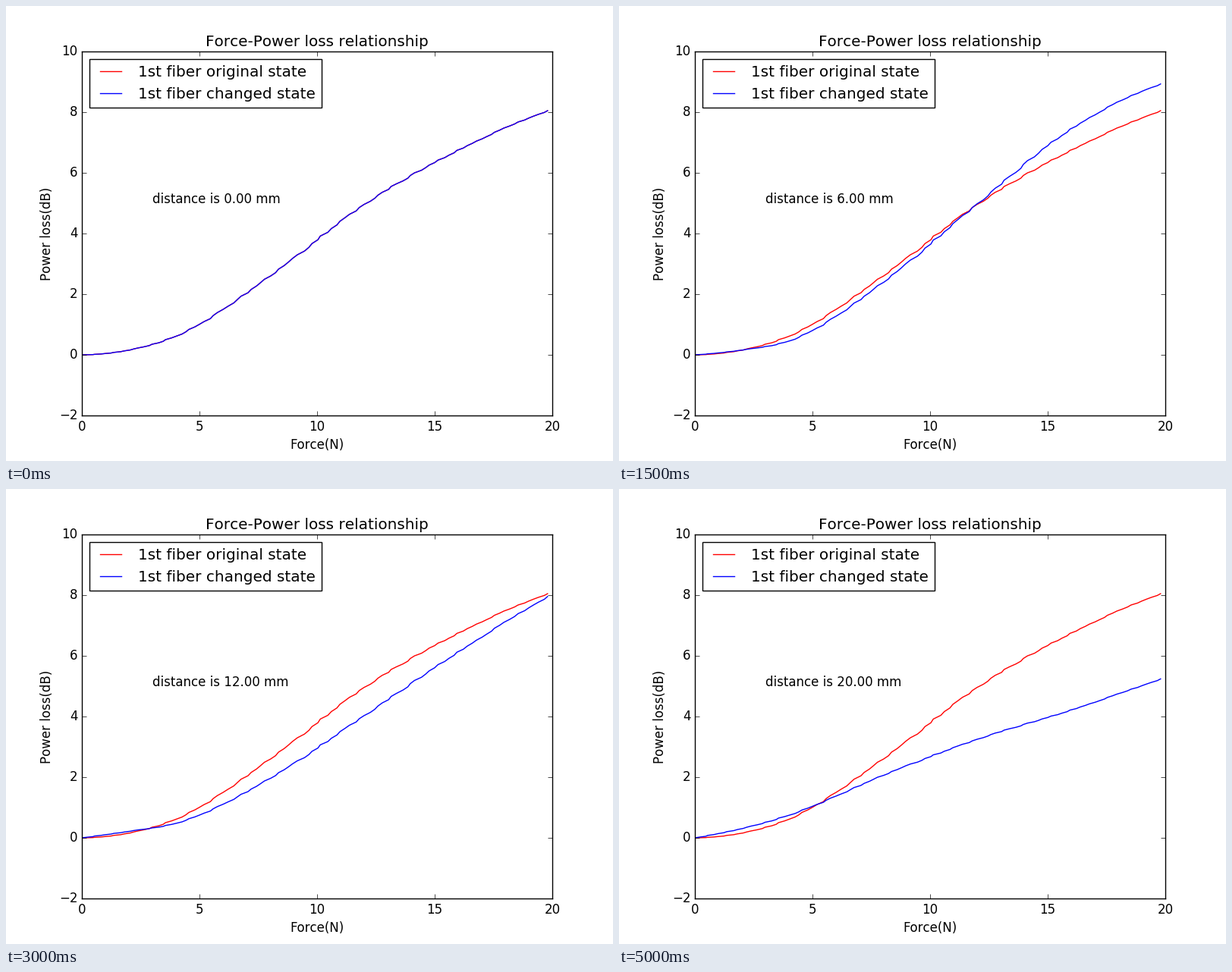
Write a matplotlib script that moves like this. It is 800 px wide and 600 px high and loops after 5.5 s.

```python
import numpy as np
import matplotlib.pyplot as plt
from matplotlib.animation import FuncAnimation

plt.style.use("classic")
plt.rcParams.update({
    "font.family": "DejaVu Sans",
    "text.kerning_factor": 6,
    "figure.facecolor": "white",
    "savefig.facecolor": "white",
    "savefig.dpi": "figure",
})

# Key points: power loss at a few forces, by distance in mm
KEY_FORCES = [0, 2, 4, 8, 12, 16, 19.8]
KEY_LOSS = {
    0: [0, .16, .62, 2.60, 4.96, 6.74, 8.05],
    2: [0, .10, .51, 2.64, 5.30, 7.40, 8.70],
    6: [0, .16, .46, 2.39, 4.98, 7.44, 8.93],
    10: [0, .22, .48, 2.10, 4.42, 6.79, 8.58],
    14: [0, .21, .49, 1.83, 3.61, 5.36, 7.16],
    18: [0, .24, .55, 1.57, 2.80, 4.01, 5.42],
    20: [0, .31, .75, 2.06, 3.25, 4.21, 5.24],
}
DISTANCES = np.arange(0, 21, 2)


def hermite(xs, ys, x):
    """Smooth curve through the rows of ys, evaluated at x."""
    xs, ys = np.asarray(xs, float), np.asarray(ys, float)
    m = np.gradient(ys, xs, axis=0, edge_order=2)
    k = np.clip(np.searchsorted(xs, x, side="right") - 1, 0, len(xs) - 2)
    h = (xs[k + 1] - xs[k])[:, None]
    t = (x - xs[k])[:, None] / h
    ease = t * t * (3 - 2 * t)
    bend = h * t * (1 - t) * ((1 - t) * m[k] - t * m[k + 1])
    return ys[k] + ease * (ys[k + 1] - ys[k]) + bend


# Even samples, with a force reading that jitters the same way in every curve
samples = np.linspace(0, 19.8, 100)
jitter = np.random.default_rng(4).uniform(-0.07, 0.07, len(samples))
jitter[[0, -1]] = 0
force = samples + jitter

measured = hermite(KEY_FORCES, np.transpose(list(KEY_LOSS.values())), samples)
curves = hermite(list(KEY_LOSS), measured.T, DISTANCES)

fig, ax = plt.subplots(figsize=(8, 6), dpi=100)
ax.plot(force, curves[0], "r", label="1st fiber original state")
changed, = ax.plot(force, curves[0], "b", label="1st fiber changed state")
note = ax.text(3, 5, "")
ax.set(xlim=(0, 20), ylim=(-2, 10), xlabel="Force(N)", ylabel="Power loss(dB)",
       title="Force-Power loss relationship")
ax.legend(loc="upper left")


def update(i):
    changed.set_ydata(curves[i])
    note.set_text(f"distance is {DISTANCES[i]:.2f} mm")
    return changed, note


anim = FuncAnimation(fig, update, frames=len(DISTANCES), interval=500,
                     repeat=True, repeat_delay=0)
plt.show()
```
